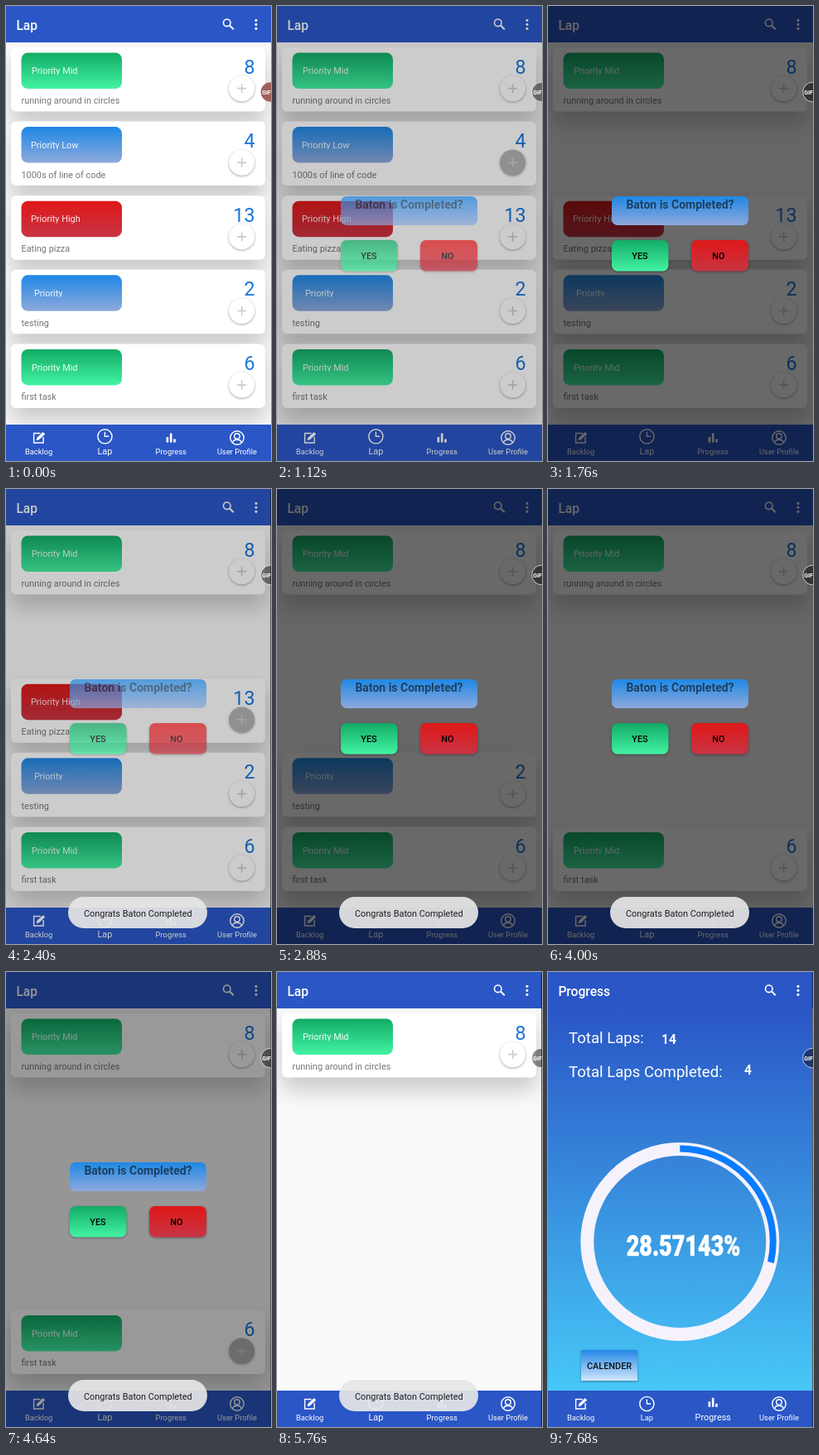
An HTML page that plays this animation: 320x550 px, repeating every 9600 ms.

```html
<!DOCTYPE html>
<html lang="en">
<head>
<meta charset="utf-8">
<title>Lap tracker</title>
<style>
  html, body { margin: 0; width: 100%; height: 100%; overflow: hidden; background: #fafafa; }
  svg { display: block; }
  text { font: 10.9px Roboto, sans-serif; }
  .medium { font-weight: 500; }
  .bold { font-weight: 700; }
  .big { font-size: 18.6px; }
  .head { font-size: 15.6px; }
  .line { fill: none; stroke: #fff; stroke-width: 1.4; }
  .soft { filter: drop-shadow(0 1px 1.5px rgba(0, 0, 0, .35)); }
  .percent { font-weight: 900; font-size: 27px; stroke: #fff; stroke-width: .5; }
</style>
</head>
<body>
<svg width="320" height="550" viewBox="0 0 320 550">
  <defs id="defs">
    <filter id="blur" x="-20%" y="-60%" width="140%" height="220%"><feGaussianBlur stdDeviation="13"/></filter>
    <clipPath id="badgeClip"><rect x="18" y="18" width="122" height="15.2"/></clipPath>
  </defs>

  <g id="lapPage"><g id="shadows"></g><g id="cards"></g></g>

  <g id="progressPage" fill="#fff">
    <rect y="44" width="320" height="463" fill="url(#sky)"/>
    <text x="25" y="86" class="big">Total Laps:</text>
    <text x="137" y="87" class="bold head">14</text>
    <text x="25" y="127" class="big">Total Laps Completed:</text>
    <text x="237" y="123.5" class="bold head">4</text>
    <g transform="translate(159.3 326) rotate(-90)" fill="none">
      <circle r="112" stroke="#f5f2fb" stroke-width="16"/>
      <circle id="arc" r="112.5" stroke="#0a7cff" stroke-width="8" pathLength="100"/>
    </g>
    <text class="percent" text-anchor="middle" transform="translate(163.5 343) scale(1 1.33)">28.57143%</text>
    <rect class="soft" x="40" y="457" width="68" height="37" fill="url(#pale)"/>
    <text x="74" y="479.5" class="medium" text-anchor="middle" fill="#111">CALENDER</text>
  </g>

  <rect width="320" height="44" fill="#2a56c6"/>
  <text id="title" x="12.4" y="28.5" class="medium head" fill="#fff"></text>
  <circle class="line" cx="266.8" cy="20.3" r="4.3" style="stroke-width:1.6"/>
  <path class="line" d="M270 23.5l4.8 4.8" style="stroke-width:2"/>
  <path class="line" d="M302 17.3v11" stroke-linecap="round" stroke-dasharray="0 5" style="stroke-width:3.2"/>

  <rect y="506" width="320" height="44" fill="#2a56c6"/>
  <g id="nav"></g>

  <rect id="dim" width="320" height="550"/>
  <g id="dialog" text-anchor="middle">
    <rect x="77" y="230" width="165" height="35" rx="7" fill="url(#blue)"/>
    <text x="159.5" y="245" class="bold" fill-opacity=".56" style="font-size:14px">Baton is Completed?</text>
    <rect class="soft" x="77" y="283" width="68.5" height="37.5" rx="7" fill="url(#green)"/>
    <text x="111" y="306" class="medium">YES</text>
    <rect class="soft" x="173" y="283" width="69" height="37.5" rx="7" fill="url(#red)"/>
    <text x="206" y="306" class="medium">NO</text>
  </g>
  <g id="toast">
    <rect x="75" y="493" width="168" height="38" rx="19" fill="#e6e6e6" fill-opacity=".92"/>
    <text x="159.3" y="517" text-anchor="middle" fill="#1c1c1c">Congrats Baton Completed</text>
  </g>
  <g id="edge">
    <rect x="319" width="1" height="550" fill="#122453"/>
    <rect x="319" y="44" width="1" height="462" fill="#5c5c5c"/>
  </g>
  <circle id="bubble" cx="319.5" cy="104" r="11.8"/>
  <text x="309.3" y="106.7" class="bold" fill="#fff" style="font-size:7px">GIF</text>
</svg>

<script>
const $ = id => document.getElementById(id);
const LOOP = 9600, STEP = 160;

const gradients = {
  green: ['#12ab66', '#43f3a3'],
  blue: ['#1e88e5', '#8ea9dc'],
  red: ['#df1818', '#c83444'],
  pale: ['#2488e8', '#d2e6fb'],
  sky: ['#2a56c6', '#47c8f7'],
};
$('defs').innerHTML += Object.entries(gradients).map(([id, [top, bottom]]) =>
  `<linearGradient id="${id}" x2="0" y2="1"><stop stop-color="${top}"/>
   <stop offset="1" stop-color="${bottom}"/></linearGradient>`).join('');

const cards = [
  ['green', 'Priority Mid', 31, '8', 'running around in circles'],
  ['blue', 'Priority Low', 30, '4', '1000s of line of code'],
  ['red', 'Priority High', 30, '13', 'Eating pizza'],
  ['blue', 'Priority', 34, '2', 'testing'],
  ['green', 'Priority Mid', 31, '6', 'first task'],
];
cards.forEach(([color, badge, x, laps, task], i) => {
  const y = 50 + i * 89.6;
  $('shadows').innerHTML += `<rect x="6" y="${y + 15}" width="307" height="77.5"
    fill-opacity=".2" filter="url(#blur)"/>`;
  $('cards').innerHTML += `<g transform="translate(0 ${y})">
    <rect x="6" width="307" height="77.5" rx="6" fill="#fff"/>
    <rect x="18.5" y="6.5" width="121.5" height="43.5" rx="8" fill="url(#${color})"/>
    <g clip-path="url(#badgeClip)"><text x="${x}" y="32.3" fill="#fff" fill-opacity=".92">${badge}</text></g>
    <text x="18.5" y="68" fill="#757575">${task}</text>
    <text x="300.5" y="31.5" text-anchor="end" fill="#1a76d8" style="font-size:23.3px">${laps}</text>
    <g transform="translate(284.7 49.7)"><circle class="soft plus" r="15.5"/>
      <path d="M-5.5 0h11M0-5.5v11" stroke="#cdcdcd" stroke-width="1.7"/></g>
  </g>`;
});

// Icons are drawn around their own centre.
const line = d => `<path class="line" d="${d}"/>`;
const ring = (r, y = 0) => `<circle class="line" r="${r}" cy="${y}"/>`;
const tabs = [
  ['Backlog', line('M2-5.5H-6V6H5.5V-1') + '<path fill="#fff" d="M-3 3l.7-3L5-7l2.6 2.6L0 2.6z"/>'],
  ['Lap', ring(8.6) + line('M0-5.5V0H4.8')],
  ['Progress', '<path stroke="#fff" stroke-width="2.6" d="M-4.3 5.5V-1M0 5.5v-11M4.3 5.5v-4"/>'],
  ['User Profile', ring(8.2) + ring(3.3, -2) + line('M-5.5 6C-4.5 1 4.5 1 5.5 6')],
];
$('nav').innerHTML = tabs.map(([label, icon], i) => `<g transform="translate(${39.6 + i * 79.8} 0)">
  <g class="icon">${icon}</g><text y="542" text-anchor="middle" fill="#fff">${label}</text></g>`).join('');

// Each dialog opens, is answered with YES on its fifth step, then fades.
const FIRST = 1120, CYCLE = 7 * STEP, FULL = .59, PAGE_CHANGE = 6720;
const openDims = [.48, .2, .47, .4];

function dialogAt(t) {
  const cycle = Math.floor((t - FIRST) / CYCLE);
  if (cycle < 0) return { removed: 0, dim: 0, pressed: 0 };
  const step = (t - FIRST) % CYCLE / STEP;
  if (cycle > 3) return { removed: 4, dim: t < FIRST + 4 * CYCLE + STEP ? .05 : 0, pressed: 0 };
  const open = openDims[cycle];
  const dims = [cycle ? .05 : .2, open, Math.min(FULL, open + .28), FULL, FULL, .42, .15];
  return {
    removed: cycle + (step >= 4),
    dim: dims[step],
    pressed: step < (cycle ? 3 : 2) ? cycle + 1 : 0,
  };
}

const clamp = v => Math.min(1, Math.max(0, v));
const show = (el, on) => { el.style.display = on ? '' : 'none'; };
const cardGroups = [...$('cards').children], shadowRects = [...$('shadows').children];
const plusButtons = [...document.querySelectorAll('.plus')];
const navItems = [...$('nav').children];

function render(time) {
  const t = Math.floor(time / STEP) * STEP;
  const { removed, dim, pressed } = dialogAt(t);
  const onProgress = t >= PAGE_CHANGE;

  show($('lapPage'), !onProgress);
  show($('progressPage'), onProgress);
  $('title').textContent = onProgress ? 'Progress' : 'Lap';
  cardGroups.forEach((card, i) => {
    const visible = i === 0 || i > removed;
    show(card, visible);
    show(shadowRects[i], visible);
    plusButtons[i].style.fill = pressed && pressed === i ? '#b4b4b4' : '#fff';
  });

  const k = clamp((t - PAGE_CHANGE) / 960);
  const share = 400 / 14 * (1 - Math.cos(Math.PI * k)) / 2;
  $('arc').setAttribute('stroke-dasharray', `${share} 200`);
  show($('arc'), share > 0);

  const shift = clamp((t - PAGE_CHANGE + STEP) / (2 * STEP));
  navItems.forEach((item, i) => {
    const active = i === 1 ? 1 - shift : i === 2 ? shift : 0;
    item.querySelector('.icon').setAttribute('transform', `translate(0 ${522 - 1.7 * active})`);
    item.querySelector('text').style.fontSize = `${9.33 + 1.57 * active}px`;
  });

  $('dim').style.opacity = dim;
  $('dialog').style.opacity = clamp(dim * 3.5);
  $('toast').style.opacity = Math.min(clamp((t - 1920) / 320), clamp((7520 - t) / 480));
  show($('edge'), t >= 1440);
  const recording = t < FIRST;
  $('bubble').style.fill = recording ? 'rgba(145,72,66,.85)' : 'rgba(0,0,0,.45)';
  $('bubble').style.stroke = recording ? 'none' : 'rgba(255,255,255,.7)';
}

const start = performance.now();
function tick(now) {
  render(Math.max(0, now - start) % LOOP);
  requestAnimationFrame(tick);
}
render(0);
requestAnimationFrame(tick);
</script>
</body>
</html>
```
